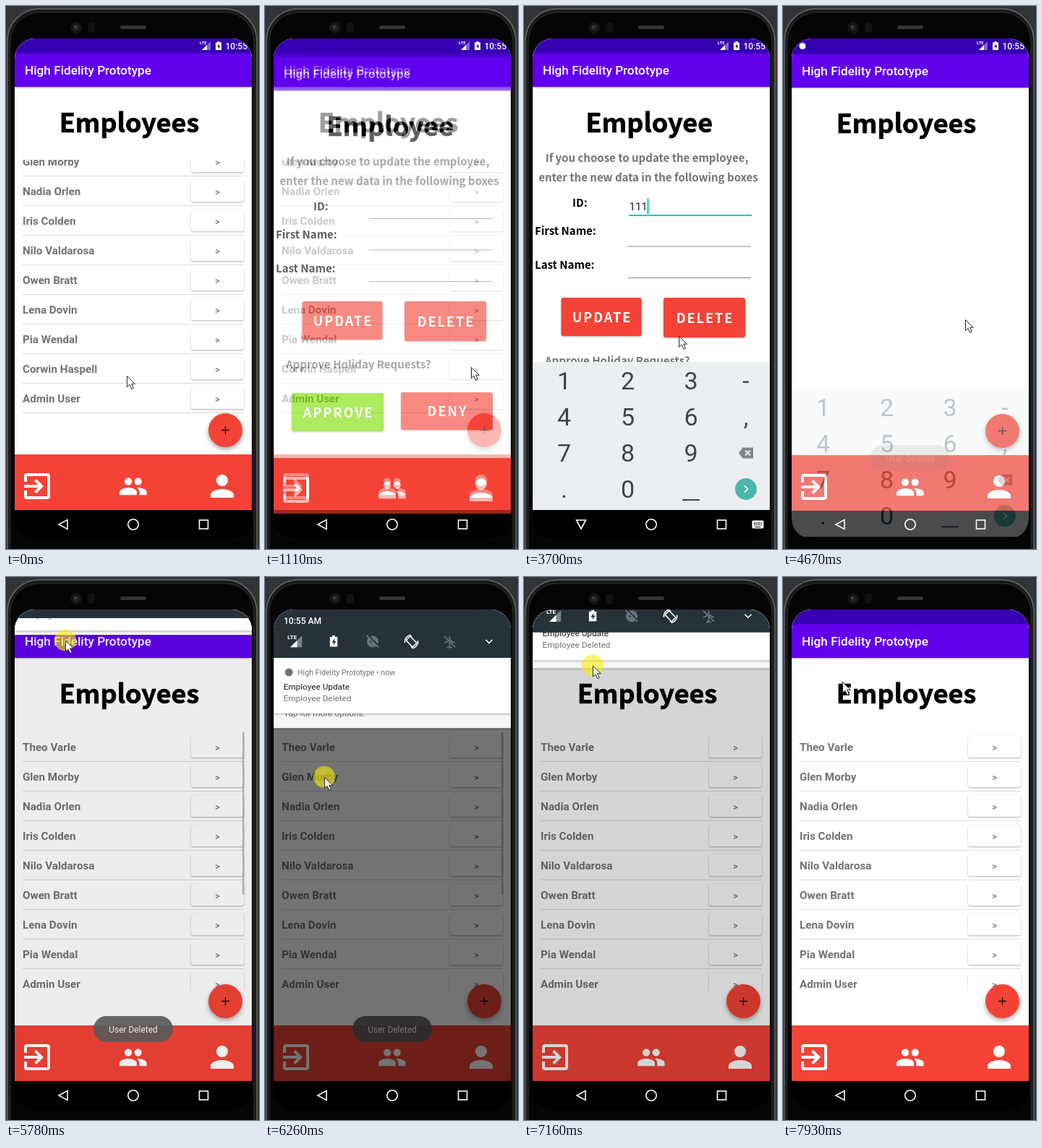
These frames come from a looping animation (350x752 px, 8 s). An HTML page:

```html
<!DOCTYPE html>
<html lang="en">
<head>
<meta charset="utf-8">
<title>Employee manager</title>
<style>
html, body { margin: 0; width: 100%; height: 100%; overflow: hidden; background: #333437; }
svg { display: block; width: 350px; height: 752px; font-family: Roboto, "Open Sans", sans-serif; }
.head, .label, .action { font-family: "Noto Sans CJK JP", "Noto Sans CJK SC", "Noto Sans", sans-serif; font-weight: 700; }
.head { font-size: 36px; text-anchor: middle; stroke: #000; stroke-width: .7; }
.label { font-size: 15px; }
.action { font-size: 18px; letter-spacing: 2px; fill: #fff; }
.gray { fill: #737373; }
.mid { text-anchor: middle; }
.row { font-size: 15.2px; font-weight: 700; fill: #737373; }
.key { font-size: 34px; fill: #37474f; text-anchor: middle; }
.raised { filter: drop-shadow(0 1px 1px rgba(0,0,0,.32)); }
.line { fill: none; stroke: #fff; stroke-width: 1.6; }
</style>
</head>
<body>
<svg viewBox="0 0 350 752">
  <defs>
    <clipPath id="screenClip"><rect x="12" y="45" width="328" height="693" rx="28"/></clipPath>
    <clipPath id="listClip"><rect x="12" y="213" width="328" height="360"/></clipPath>
    <g id="appBar">
      <rect x="12" y="45" width="328" height="653" fill="#fff"/>
      <rect class="raised" x="12" y="65" width="328" height="47" fill="#6200ee"/>
      <rect x="12" y="40" width="328" height="25.5" fill="#3700b3"/>
      <text x="26" y="95" font-size="17.2" font-weight="500" fill="#fff">High Fidelity Prototype</text>
    </g>
    <g id="bottomBar">
      <rect x="12" y="621" width="328" height="77" fill="#f44336"/>
      <g fill="#fff">
        <path transform="translate(19 641) scale(2)" d="M10.1 15.6 11.5 17l5-5-5-5-1.4 1.4 2.6 2.6H3v2h9.7zM19 3H5a2 2 0 0 0-2 2v4h2V5h14v14H5v-4H3v4a2 2 0 0 0 2 2h14a2 2 0 0 0 2-2V5a2 2 0 0 0-2-2z"/>
        <path transform="translate(155.5 645) scale(1.7)" d="M16 11a3 3 0 1 0-3-3 3 3 0 0 0 3 3zm-8 0a3 3 0 1 0-3-3 3 3 0 0 0 3 3zm0 2c-2.3 0-7 1.2-7 3.5V19h14v-2.5c0-2.3-4.7-3.5-7-3.5zm8 0-1 .05c1.2.85 2 2 2 3.45V19h6v-2.5c0-2.3-4.7-3.5-7-3.5z"/>
        <path transform="translate(275 641) scale(2)" d="M12 12a4 4 0 1 0-4-4 4 4 0 0 0 4 4zm0 2c-2.7 0-8 1.3-8 4v2h16v-2c0-2.7-5.3-4-8-4z"/>
      </g>
    </g>
    <g id="signal">
      <path d="M0 12 12 0V12z" fill="#fff" opacity=".4"/><path d="M0 12 7 5V12z" fill="#fff"/>
      <text x="-3" y="3.6" font-size="6" font-weight="700" fill="#fff">LTE</text>
    </g>
    <g id="battery">
      <path d="M2 0h3v1.5h2.5V12h-8V1.5H2z" fill="#fff"/><path d="M4.5 3 1.5 7.5h2V10.5L6 6H4.2z" fill="#243036"/>
    </g>
  </defs>

  <rect width="350" height="752" fill="#333437"/>
  <rect x="2" y="4" width="345" height="790" rx="44" fill="#1a1a1b" stroke="#626466" stroke-width="1.5"/>
  <rect x="6" y="9" width="337" height="782" rx="40" fill="#050505" stroke="#2b2c2e"/>
  <circle cx="97" cy="30" r="8" fill="#131416"/><circle cx="97" cy="30" r="4" fill="#23262a"/><circle cx="96" cy="29" r="1.3" fill="#53595f"/>
  <rect x="113" y="23" width="10" height="14" rx="4" fill="#111214"/>
  <rect x="158" y="27" width="36" height="5" rx="2.5" fill="#333436"/>

  <g clip-path="url(#screenClip)">
    <rect x="12" y="45" width="328" height="653" fill="#fff"/>
    <rect x="12" y="698" width="328" height="40" fill="#000"/>
    <g id="listPage">
      <use href="#appBar"/>
      <text class="head" x="170.5" y="175">Employees</text>
      <g clip-path="url(#listClip)"><g id="rowsBefore"></g><g id="rowsAfter"></g></g>
      <rect id="scrollbar" x="327" y="215" width="2.500" height="225"/>
      <use href="#bottomBar"/>
      <g>
        <circle cx="303.5" cy="587.5" r="23.5" fill="#f44336" style="filter:drop-shadow(0 3px 3px rgba(0,0,0,.35))"/>
        <path d="M298 587.5h11M303.5 582v11" stroke="#111" stroke-width="1.3"/>
      </g>
    </g>
    <g id="detailPage">
      <use href="#appBar"/>
      <text class="head" x="173.300" y="175">Employee</text>
      <g class="label">
        <text class="gray mid" x="170" y="215.5">If you choose to update the employee,</text>
        <text class="gray mid" x="172" y="242.5">enter the new data in the following boxes</text>
        <text x="67" y="278">ID:</text>
        <text x="15" y="317">First Name:</text>
        <text x="15" y="364">Last Name:</text>
        <text class="gray" x="29" y="497">Approve Holiday Requests?</text>
      </g>
      <path d="M144 333h170M144 376.5h170" stroke="#8a8a8a"/>
      <rect id="idLine" x="145" width="170"/>
      <text id="idText" x="145.5" y="283" font-size="15" fill="#222"></text>
      <rect id="caret" y="266" width="2" height="22" fill="#03cbb8"/>
      <g id="actions"></g>
      <rect id="ripple" x="193" y="404" width="113" height="55" rx="3" fill="#fff"/>
      <use href="#bottomBar"/>
    </g>

    <g id="status">
      <circle id="notice" cx="27" cy="55.5" r="4.5" fill="#fff"/>
      <use href="#signal" x="271" y="49"/><use href="#battery" x="290.5" y="49"/>
      <text x="303.5" y="60" font-size="12" font-weight="500" fill="#fff">10:55</text>
    </g>

    <g id="toast">
      <rect x="121" y="608" width="110" height="36" rx="18" fill="#616161" opacity=".92"/>
      <text class="mid" x="176" y="630.5" font-size="11.9" fill="#fff">User Deleted</text>
    </g>

    <rect id="dim" x="12" y="45" width="328" height="653"/>
    <g id="shade">
      <rect id="cardTwo" x="12" y="45" width="328" fill="#f5f5f5" class="raised"/>
      <g id="cardTwoText" font-size="11.8">
        <circle cx="33" cy="-56" r="5.5" fill="#757575"/>
        <text x="45" y="-52" font-size="10.6" fill="#6f6f6f">System service</text>
        <text x="26" y="-32" fill="#222">Charging this device via USB</text>
        <text x="26" y="-16" fill="#6f6f6f">Tap for more options.</text>
      </g>
      <g id="cardOne" font-size="11.8">
        <rect class="raised" x="12" y="-77" width="328" height="77" fill="#fff"/>
        <circle cx="33" cy="-57" r="5.5" fill="#757575"/>
        <text x="45" y="-53" font-size="10.6" fill="#6f6f6f">High Fidelity Prototype • now</text>
        <text x="25.5" y="-33" fill="#1c1c1c">Employee Update</text>
        <text x="25.5" y="-17" fill="#737373">Employee Deleted</text>
      </g>
      <g id="header">
        <rect x="12" y="0" width="328" height="112" fill="#263238"/>
        <text x="26" y="64.5" font-size="12" font-weight="500" fill="#fff">10:55 AM</text>
        <use href="#signal" transform="translate(35 81) scale(1.35)"/>
        <use href="#battery" transform="translate(90.5 81) scale(1.3)"/>
        <g stroke="#68737a" fill="none" stroke-width="1.8">
          <circle cx="149" cy="89.500" r="8" fill="#68737a" stroke="none"/>
          <path d="M145 89.500h8M142 80l16 16" stroke="#263238"/><path d="m140.500 81 16.500 16.500"/>
          <path d="M255.5 82v15M248 91.5l7.5-4 7.5 4M252 97.5h7M248 82l15 15"/>
        </g>
        <g class="line">
          <rect x="198.500" y="83" width="8" height="13" rx="1" transform="rotate(-45 202.5 89.5)"/>
          <path d="M193.500 91a9.200 9.200 0 0 1 7-10.500l2.500 2.500M211.500 88a9.200 9.200 0 0 1-7 10.500l-2.500-2.500"/>
          <path d="m305.5 87 4.5 4.5 4.5-4.5"/>
        </g>
      </g>
    </g>

    <g id="keyboard">
      <rect x="12" y="493" width="328" height="205" fill="#ebeff1"/>
      <g id="keys"></g>
      <path d="M219 684h24" stroke="#37474f" stroke-width="1.8"/>
      <path d="M297 619l5.5-7.5H317v15h-14.5z" fill="#7b868b"/>
      <path d="m306 615.5 7 7m0-7-7 7" stroke="#ebeff1" stroke-width="1.8"/>
      <circle cx="307" cy="669" r="15" fill="#4db6ac"/>
      <path class="line" d="m305 664.5 4.5 4.5-4.5 4.5"/>
    </g>
    <g class="line">
      <path id="back"/>
      <circle cx="176" cy="718" r="7.2"/><rect x="267.5" y="712" width="12" height="12"/>
    </g>
    <g id="keyboardIcon">
      <rect x="315.5" y="712.5" width="16" height="11" rx="1.5" fill="#fff"/>
      <path d="M318 716h11M318 718.5h11" stroke="#000" stroke-width="1.3" stroke-dasharray="1.5 1"/><path d="M319.5 721.5h8" stroke="#000"/>
    </g>
  </g>

  <circle id="press" r="15" fill="#f8ec0a" opacity=".6"/>
  <path id="pointer" d="M.5.5v15l3.5-3.2 2.7 6 2.6-1.2-2.7-5.8h4.7z" fill="#fff" stroke="#222" stroke-linejoin="round"/>
</svg>
<script>
const LOOP = 8000;
const $ = id => document.getElementById(id);
const set = (id, attrs) => { for (const k in attrs) $(id).setAttribute(k, attrs[k]); };
const show = (id, on) => $(id).style.display = on ? "" : "none";
const shift = (id, x, y) => set(id, { transform: `translate(${x} ${y})` });
const ramp = (t, from, to) => Math.min(1, Math.max(0, (t - from) / (to - from)));
const mix = (a, b, p) => a + (b - a) * p;

// Interpolates stops of the form [time, ...values].
function track(t, stops) {
  const i = stops.findIndex(s => s[0] > t);
  if (i === 0) return stops[0].slice(1);
  if (i < 0) return stops[stops.length - 1].slice(1);
  const a = stops[i - 1], b = stops[i], p = ramp(t, a[0], b[0]);
  return a.slice(1).map((v, k) => mix(v, b[k + 1], p));
}

const staff = ["Theo Varle", "Glen Morby", "Nadia Orlen", "Iris Colden", "Nilo Valdarosa",
  "Owen Bratt", "Lena Dovin", "Pia Wendal", "Corwin Haspell", "Admin User"];

function rows(names, top) {
  return names.map((name, i) => {
    const y = top + 41 * i;
    return `<text class="row" x="23" y="${y + 5.5}">${name}</text>
      <rect class="raised" x="256" y="${y - 15.5}" width="73" height="30" rx="3" fill="#fff"/>
      <text class="row mid" x="292.5" y="${y + 5}" style="font-size:13px;fill:#888">&gt;</text>
      <path d="M23 ${y + 20}h306" stroke="#dcdcdc"/>`;
  }).join("");
}
$("rowsBefore").innerHTML = rows(staff, 174.5);
$("rowsAfter").innerHTML = rows(staff.filter(name => name !== "Corwin Haspell"), 235.5);

$("actions").innerHTML = [
  ["UPDATE", 51.5, 404, 111, 53, "#f44336"], ["DELETE", 193, 404, 113, 55, "#f44336"],
  ["APPROVE", 37, 531, 127, 53, "#7be000"], ["DENY", 188, 530, 127, 52, "#f44336"]
].map(([name, x, y, w, h, color]) =>
  `<rect class="raised" x="${x}" y="${y}" width="${w}" height="${h}" rx="3" fill="${color}"/>
   <text class="action mid" x="${x + w / 2 + 1}" y="${y + h / 2 + 7}">${name}</text>`).join("");

const columns = [55.5, 143.5, 231, 307];
$("keys").innerHTML = ["123-", "456,", "789", ".0"].map((line, r) =>
  [...line].map((c, i) => `<text class="key" x="${columns[i]}" y="${531 + 50 * r}">${c}</text>`).join("")).join("");

const pointerPath = [
  [0, 167, 512], [70, 175, 512], [420, 285, 500], [1500, 285, 500], [1990, 181, 276], [2240, 181, 279],
  [3150, 181, 279], [3480, 240, 444], [3630, 240, 444], [3700, 214, 457], [3980, 252, 434],
  [4950, 252, 434], [5400, 100, 14], [5540, 82, 50], [5700, 82, 50], [6190, 82, 277],
  [6600, 82, 277], [6900, 96, 262], [7020, 96, 262], [7160, 95, 123], [7290, 81, 52],
  [7790, 78, 52], [7860, 78, 95], [7930, 82, 145]];
const presses = [[570, 840], [2040, 2250], [4060, 4270], [5580, 6330], [6970, 7320]];
const shadePath = [[5650, 45], [6260, 209], [6480, 267], [7020, 267], [7160, 127], [7300, 45]];
const dimPath = [[45, 0], [127, .165], [209, .55], [267, .6]];

function drawPages(t) {
  const entering = ramp(t, 1020, 1240), leaving = ramp(t, 4500, 4720);
  const slide = p => Math.ceil(20 * (1 - p) ** 3);
  shift("detailPage", 0, slide(entering));
  set("detailPage", { opacity: t < 4500 ? Math.min(1, entering * 1.5) : 1 - Math.min(1, leaving * 1.5) });
  show("detailPage", t > 1020 && leaving < 1);
  shift("listPage", 0, t < 4500 ? 0 : slide(leaving));
  show("rowsBefore", t < 4500);
  show("rowsAfter", t >= 4800);
  show("scrollbar", t >= 4800 && t < 6700);
  set("scrollbar", { opacity: .25 * (1 - ramp(t, 6200, 6700)) });
  set("ripple", { opacity: .25 * ramp(t, 4080, 4180) * (1 - ramp(t, 4260, 4420)) });
}

function drawField(t) {
  const focused = t >= 2180;
  const typed = [2990, 3150, 3300].filter(at => t >= at).length;
  set("idLine", focused ? { y: 289, height: 2, fill: "#03cbb8" } : { y: 289, height: 1, fill: "#8a8a8a" });
  $("idText").textContent = "1".repeat(typed);
  set("caret", { x: 145 + 8.5 * typed });
  show("caret", focused);
}

function drawKeyboard(t) {
  const out = t - 4590;
  const drop = out > 0 ? out * .46 : 110 * (1 - ramp(t, 2390, 2590)) ** 2;
  shift("keyboard", 0, drop);
  set("keyboard", { opacity: out > 0 ? 1 - ramp(out, 0, 118) : ramp(t, 2390, 2507) });
  const open = t >= 2390 && t < 4590;
  show("keyboardIcon", open);
  set("back", { d: open ? "M72.5 712h13l-6.5 12z" : "M85 711.5v13l-12-6.5z" });
}

function drawShade(t) {
  const [bottom] = track(t, shadePath);
  const closing = Math.min(0, bottom - 209);
  const cardEnd = 189 + closing * .89;
  show("shade", bottom > 45);
  shift("header", 0, closing * .427);
  shift("cardOne", 0, cardEnd);
  shift("cardTwoText", 0, bottom);
  set("cardTwo", { height: bottom - 45 });
  set("dim", { opacity: track(bottom, dimPath)[0] });
  show("status", t < 5650);
  show("notice", t >= 4440);
}

function render(t) {
  drawPages(t);
  drawField(t);
  drawKeyboard(t);
  drawShade(t);
  set("toast", { opacity: ramp(t, 4640, 4840) * (1 - ramp(t, 6550, 6750)) });
  const [x, y] = track(t, pointerPath);
  shift("pointer", x, y);
  shift("press", x, y);
  show("press", presses.some(([from, to]) => t >= from && t < to));
}

function tick() {
  render(performance.now() % LOOP);
  requestAnimationFrame(tick);
}
tick();
</script>
</body>
</html>
```
